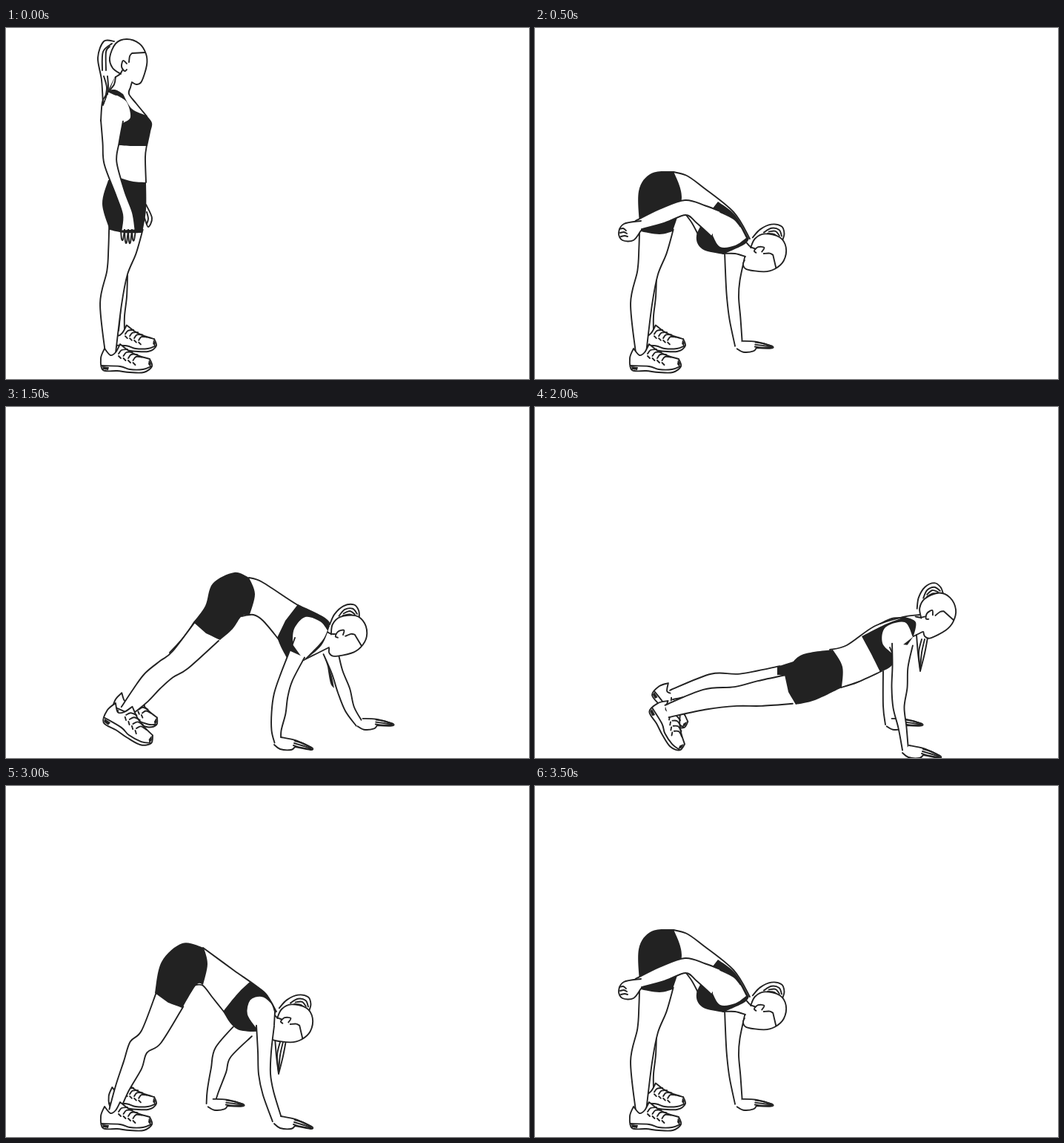
Write an HTML page with a canvas that moves like this. It is 706 px wide and 473 px high and loops after 4000 ms.

```html
<!DOCTYPE html>
<html lang="en">
<head>
<meta charset="utf-8">
<title>Walkout exercise</title>
<style>
html, body { margin: 0; width: 100%; height: 100%; overflow: hidden; background: #fff; }
canvas { display: block; }
</style>
</head>
<body>
<canvas id="stage" width="706" height="473"></canvas>
<script>
const ctx = document.getElementById('stage').getContext('2d');
const INK = '#222', SKIN = '#fff';
const HOLD = 500;

const points = text => text.trim().split(/\s+/).map(p => p.split(',').map(Number));

// Smooth curve through all points, continuing the given path.
function spline(path, pts) {
  for (let i = 0; i < pts.length - 1; i++) {
    const b = pts[i], c = pts[i + 1];
    const a = pts[i - 1] || b, d = pts[i + 2] || c;
    path.bezierCurveTo(
      b[0] + (c[0] - a[0]) / 6, b[1] + (c[1] - a[1]) / 6,
      c[0] - (d[0] - b[0]) / 6, c[1] - (d[1] - b[1]) / 6, c[0], c[1]);
  }
  return path;
}

// Path from "x,y" points; "|" makes the previous point a corner.
function curve(text) {
  const path = new Path2D();
  let last = null;
  for (const part of text.split('|')) {
    const pts = points(part);
    if (last) pts.unshift(last); else path.moveTo(...pts[0]);
    spline(path, pts);
    last = pts[pts.length - 1];
  }
  return path;
}

function line(...texts) {
  for (const text of texts) ctx.stroke(curve(text));
}
function fill(text, color = INK) {
  ctx.fillStyle = color;
  ctx.fill(curve(text));
}
function skin(text) {
  fill(text, SKIN);
  line(text);
}

// Places a part at a joint, turned and scaled, with an even line weight.
function place(x, y, degrees, scale, draw) {
  ctx.save();
  ctx.translate(x, y);
  ctx.rotate(degrees * Math.PI / 180);
  ctx.scale(scale, scale);
  ctx.lineWidth /= scale;
  draw();
  ctx.restore();
}

// Arm or leg from "x,y,width" joints, open at both ends.
function limb(text) {
  const joints = points(text);
  const side = sign => joints.map(([x, y, width], i) => {
    const [ax, ay] = joints[Math.max(i - 1, 0)];
    const [bx, by] = joints[Math.min(i + 1, joints.length - 1)];
    const k = sign * width / 2 / Math.hypot(bx - ax, by - ay);
    return [x - (by - ay) * k, y + (bx - ax) * k];
  });
  const left = side(1), right = side(-1).reverse();
  const body = new Path2D();
  body.moveTo(...left[0]);
  spline(body, left);
  body.lineTo(...right[0]);
  spline(body, right);
  ctx.fillStyle = SKIN;
  ctx.fill(body);
  for (const edge of [left, right]) {
    const path = new Path2D();
    path.moveTo(...edge[0]);
    ctx.stroke(spline(path, edge));
  }
}

// Origin: sole below the toes.
function shoe(x, y, degrees = 0, scale = 1) {
  place(x, y, degrees, scale, () => {
    skin('-62,-28 -67,-15 -64,1 -45,2 -28,4 -9,4 2,-4 -1,-14 | -15,-18 -28,-24 -41,-34 | -47,-23 -54,-19 -62,-28');
    line('-66,-5 -41,-4 -28,0 -10,0 1,-4');
    fill('-65,-4 | -56,-3 | -57,1 | -64,0');
    fill('-2,-13 | 1,-8 | 0,-3 | -3,-7');
    for (let i = 0; i < 4; i++) {
      const u = -43 + 6.5 * i, v = -21 + 3 * i;
      line(`${u},${v} ${u + 4},${v - 5} ${u + 12},${v - 6 + i / 2}`, `${u},${v + 3} ${u + 3},${v + 6}`);
    }
  });
}

// Origin: wrist.
function hand(x, y, degrees = 0, scale = 1) {
  place(x, y, degrees, scale, () => {
    skin('5,-7 24,-3 43,5 48,8 45,10 24,6 | 19,10 4,9 -4,3');
    for (let i = 0; i < 3; i++) line(`${24 - i},${-2 + 3 * i} ${34 - i},${1 + 3 * i} 46,${7 + i}`);
  });
}
const farHand = (x, y) => hand(x, y, -9, 0.93);

// Origin: middle of the skull; the face looks right when not turned.
function head(x, y, degrees, bun = true) {
  place(x, y, degrees, 1, () => {
    if (bun) {
      skin('-23,17 -32,5 -36,-11 -31,-24 -21,-26 -12,-22');
      line('-27,1 -31,-10 -27,-20 -18,-22', '-27,-6 -26,-15 -19,-19', '-25,-4 -22,-13 -17,-16');
    }
    skin('-10,22 -21,14 -25,0 -17,-19 -2,-25 15,-19 24,-5 25,10 18,32 11,36 5,33');
    line('23,-7 5,-6 | 2,-2 1,6', '-2,8 -7,4 -9,12 -5,18 -2,16', '-8,17 -11,22 -17,26');
  });
}

function tail(x, y) {
  place(x, y, 0, 1, () => {
    skin('0,0 2,25 5,49 | 11,25 15,4');
    for (const u of [7, 11]) line(`${u},6 ${u - 4},24 5,46`);
  });
}

function standingLegs(lean) {
  limb('158,334,12 159,362,8 157,388,6 156,408,8');
  shoe(201, 432, 0, 0.93);
  place(lean, 0, 0, 1, () => limb('162,268,46 157,300,38 150,330,28 141.5,372,29 141,438,14'));
  shoe(195, 460);
}

function stand() {
  skin('189,238 197,256 192,268 187,256');
  line('190,248 192,257 190,264');
  standingLegs(0);

  skin('146,18 132,18 124,40 129,70 131,104 | 140,82 148,66');
  for (let i = 0; i < 2; i++) {
    line(`${143 - 3 * i},${21 + 4 * i} ${131 + 4 * i},32 ${130 + 5 * i},57`,
      `${132 + 5 * i},65 ${136 + 2 * i},80 ${134 + 2 * i},94`);
  }
  fill('148,64 138,88 | 153,158 154,203 | 189,208 | 188,175 190,158 | 190,119 166,89 | 170,72', SKIN);
  line('148,66 146,76 139,85', '170,73 168,80 166,89 176,102 190,119', '190,158 188,174 189,208');
  head(165, 40, 0, false);
  fill('138,205 130,237 140,272 | 160,276 184,276 | 189,245 189,208 | 172,207 154,202');
  fill('135,85 147,83 158,89 | 170,109 190,118 | 197,128 195,140 191,159 | 170,159 152,158 | 150,92');
  fill('137,90 128,118 | 128,128 158,128 | 168,120 163,100 150,91', SKIN);
  limb('143,125,30 141.5,155,22 141,182,17 154,222,13 164,250,14 165,272,19');
  line('136,89 130,100 128,125');
  for (let i = 0; i < 4; i++) {
    const u = 155 + 5 * i, v = 284 + 4 * Math.sin(i);
    line(`${u},272 ${u + 1},${v} ${u + 3},${v + 1} ${u + 5},272`);
  }
}

function bend() {
  limb('270,304,28 267,340,19 267,363,16 270,392,15 275,428,10');
  farHand(276, 429);
  standingLegs(2);
  fill('187,194 225,213 268,248 291,283 | 296,300 284,308 254,304 | 220,275 204,252 | 190,252', SKIN);
  line('187,194 205,199 226,214 268,248 290,284', '204,252 212,263 220,278', '254,304 270,304 284,308');
  head(314.5, 302, 80);
  fill('142,274 140,220 157,196 187,193 | 198,228 186,274 | 168,278 142,274');
  fill('247,234 270,252 289,284 | 282,292 254,305 | 226,298 218,280 232,253');
  fill('240,270 | 245,247 268,257 277,268 285,283 | 270,293 250,295 240,280', SKIN);
  limb('247,265,36 224,251,26 203,242,20 172,253,20 138,266,13');
  line('250,248 268,257 277,267');
  skin('143,260 120,264 113,276 118,286 133,286 143,273');
  for (let i = 0; i < 3; i++) line(`${114 + i},${271 + 5 * i} ${119 + i},${270 + 5 * i} ${123 + i},${273 + 4 * i}`);
}

function reach() {
  limb('322,328,27 293,359,24 287,383,21 279,412,15 276,429,11');
  farHand(276, 429);
  shoe(201, 432, 0, 0.93);
  limb('221,288,41 196,338,31 179,352,27 171,376,26 157,407,19 146,438,14');
  shoe(195, 460);
  fill('266,218 307,247 350,280 365,304 | 345,332 310,326 294,304 | 278,283 257,268', SKIN);
  line('266,218 307,248 348,278 365,304', '256,268 266,269 278,284 294,304');
  tail(363, 339);
  head(389.5, 319, 80);
  fill('201,279 210,237 238,212 267,218 | 272,240 266,268 | 257,268 238,299 | 219,292');
  fill('329,264 351,279 365,304 | 350,328 320,330 305,322 293,304 | 304,290 317,275');
  skin('338,328 325,308 329,288 345,283 358,292 363,304 | 362,322');
  limb('350,323,24 349,358,18 349,388,16 354,414,15 366,450,13');
  hand(366, 452);
}

function walk() {
  line('254,290 241,309 221,331');
  shoe(200, 431, 22, 0.93);
  fill('428,330 439,360 443,379 | 438,372 434,350');
  limb('438,330,20 447,357,15 456,382,17 464,407,13 477,427,10');
  farHand(478, 427);
  limb('272,301,41 235,341,31 217,353,28 198,369,29 182,388,26 162,410,17');
  shoe(192, 456, 28, 1.06);
  fill('328,230 365,250 394,267 440,298 | 440,322 402,341 | 379,337 368,313 | 346,288 329,279', SKIN);
  line('328,230 346,236 394,267 430,285 437,293', '318,282 334,280 347,288 368,313', '402,341 420,332 440,322');
  head(463, 305, 62);
  fill('253,290 269,268 279,238 308,223 328,230 | 336,252 329,280 | 318,282 306,299 289,314 | 270,305');
  fill('394,266 429,283 437,295 | 426,321 402,342 | 379,338 | 372,325 366,311 | 377,288');
  fill('387,320 389,299 404,283 424,289 434,301 | 426,316 402,341', SKIN);
  limb('393,333,22 378,366,18 371,389,19 368,412,19 365,436,13 367,452,9');
  line('390,311 386,322');
  hand(366, 452);
}

function plank() {
  limb('482,354,24 482,403,24 482,428,18');
  farHand(478, 427);
  shoe(197, 433, 50, 0.93);
  limb('332,357,16 278,368,17 240,371,23 184,388,13');
  fill('327,350 358,340 | 352,354 338,362 | 327,361');
  shoe(191, 463, 56);
  limb('345,380,40 303,386,34 271,390,26 230,394,27 178,410,17');
  fill('398,327 443,308 480,285 515,281 | 525,303 485,350 | 468,356 | 435,372 414,378', SKIN);
  line('398,327 421,321 459,295 497,283 519,280', '413,378 435,371 468,356', '466,292 482,285 499,284');
  tail(515, 307);
  head(544, 276, 45);
  line('523,303 511,309');
  fill('337,361 358,335 402,327 | 415,350 414,378 | 378,395 352,401 | 342,384');
  fill('441,309 475,292 500,283 | 514,290 511,309 | 483,347 466,357 | 454,333');
  fill('482,332 469,318 473,297 499,290 510,310', SKIN);
  limb('496,320,28 493,350,21 492,378,21 491,405,15 496,432,11 500,462,8');
  line('479,324 482,331');
  hand(500, 463);
}

const POSES = [stand, bend, reach, walk, plank, walk, reach, bend];
let shown = null;

function frame() {
  const pose = POSES[Math.floor(performance.now() / HOLD) % POSES.length];
  if (pose !== shown) {
    shown = pose;
    ctx.fillStyle = '#fff';
    ctx.fillRect(0, 0, 706, 473);
    ctx.strokeStyle = INK;
    ctx.lineWidth = 1.9;
    ctx.lineCap = ctx.lineJoin = 'round';
    pose();
  }
  requestAnimationFrame(frame);
}
frame();
</script>
</body>
</html>
```
